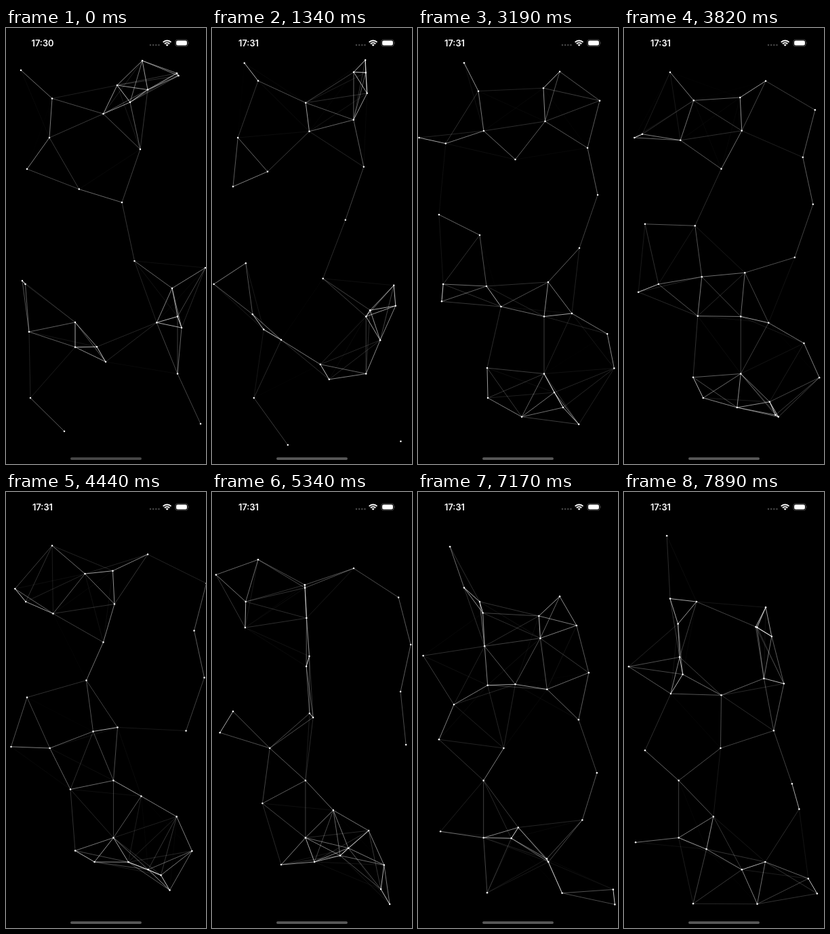
An HTML page with a canvas for the animation above (7990 ms loop, 295 px wide and 640 px high).

```html
<!DOCTYPE html>
<html lang="en">
<head>
<meta charset="utf-8">
<title>Drifting network</title>
<style>
  html, body { margin: 0; width: 100%; height: 100%; overflow: hidden; background: #000; }
  canvas, svg { position: absolute; left: 0; top: 0; width: 295px; height: 640px; }
  text { font: 600 12.8px Inter, sans-serif; text-anchor: middle; fill: #fff; }
</style>
</head>
<body>
<canvas width="295" height="640"></canvas>
<svg viewBox="0 0 295 640">
  <text id="clock" x="54" y="26.6">17:30</text>
  <path d="M213 25H226" stroke="#454545" stroke-width="2.6" stroke-linecap="round" stroke-dasharray="0 4.15"/>
  <g transform="translate(237.6 26.8)" fill="none" stroke="#fff" stroke-width="2">
    <path d="M-5.9-5.9A8.3 8.3 0 0 1 5.9-5.9M-3.6-3.6A5.1 5.1 0 0 1 3.6-3.6"/>
    <path d="M0 0L-2-2A2.9 2.9 0 0 1 2-2Z" fill="#fff" stroke="none"/>
  </g>
  <rect x="249.8" y="17.2" width="18.4" height="9.6" rx="3" fill="none" stroke="#5a5a5a" stroke-width=".8"/>
  <rect x="251.1" y="18.5" width="15.8" height="7" rx="2" fill="#fff"/>
  <path d="M269.4 20.5q1.3 1.5 0 3z" fill="#5a5a5a"/>
  <rect id="homeBar" x="95" y="630.2" width="105" height="3.7" rx="1.85"/>
</svg>
<script>
const LOOP = 7990, STEP_MS = 102.7, STEP_PX = 2.29, REACH = 111.5;
const ctx = document.querySelector('canvas').getContext('2d');
const clock = document.getElementById('clock');
const homeBar = document.getElementById('homeBar');

// Starting points, grouped by heading: right first, then clockwise in eighths of a turn
const points = [
  '36,543',
  '171,256 198,178 183,109 245,382 222.3,432.4 287,581 134,468 147,490 86,592',
  '31,207 143.5,126 102,432',
  '189.5,342 164,84 254.5,70 294,352',
  '64,161 253,423.5 253,507.5 28.5,376',
  '107.8,236.6 252,66.4 259,440 102,468.4',
  '68,103.4 209,90.6',
  '22,62 201,48 24,371 34,446'
].flatMap((group, eighth) => group.split(' ').map(pair => {
  const [x, y] = pair.split(',').map(Number);
  const angle = eighth * Math.PI / 4;
  return { x, y, dx: Math.round(Math.cos(angle)), dy: Math.round(Math.sin(angle)) };
}));

const bounce = (v, min, max) => v < min ? 2 * min - v : v > max ? 2 * max - v : v;

function draw(now) {
  const step = Math.floor((now % LOOP + 23) / STEP_MS);
  const travel = STEP_PX * Math.max(0, step - 1.73);
  const dots = points.map(({ x, y, dx, dy }) => [
    bounce(x + dx * travel, -0.7, 295.6),
    bounce(y + dy * travel, 43.8, 614.9)
  ]);

  ctx.clearRect(0, 0, 295, 640);
  ctx.lineWidth = 1;
  ctx.strokeStyle = ctx.fillStyle = '#fff';
  dots.forEach(([x, y], i) => {
    for (const [x2, y2] of dots.slice(i + 1)) {
      ctx.globalAlpha = Math.max(0, 1 - Math.hypot(x2 - x, y2 - y) / REACH);
      ctx.beginPath();
      ctx.moveTo(x, y);
      ctx.lineTo(x2, y2);
      ctx.stroke();
    }
  });

  ctx.globalAlpha = 1;
  for (const [x, y] of dots) {
    ctx.beginPath();
    ctx.arc(x, y, 1.25, 0, 2 * Math.PI);
    ctx.fill();
  }

  clock.textContent = step < 6 ? '17:30' : '17:31';
  homeBar.setAttribute('fill', step < 6 ? '#484848' : '#585858');
  requestAnimationFrame(() => draw(performance.now()));
}
draw(0);
</script>
</body>
</html>
```
